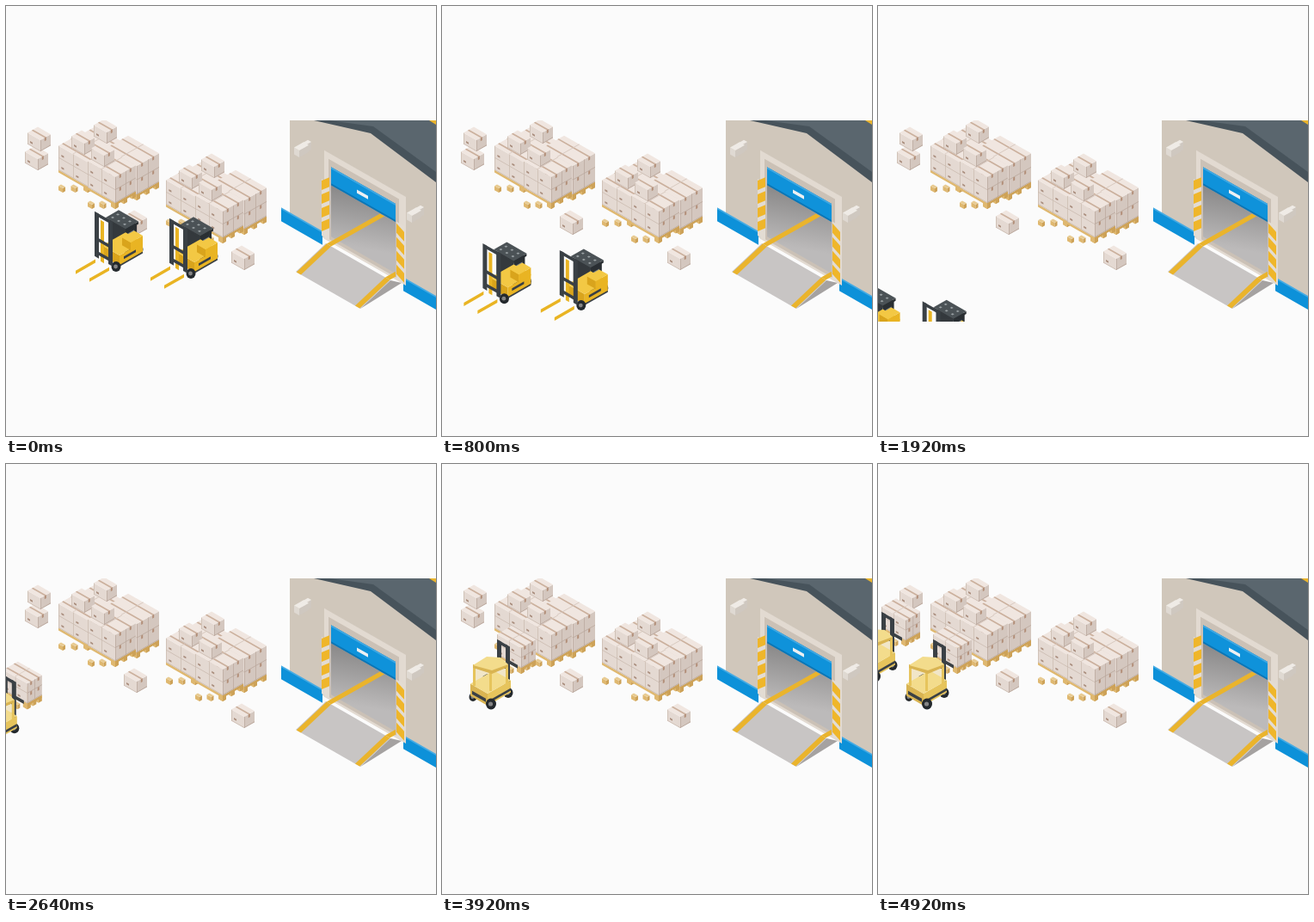
These frames come from a looping animation (500 by 500 pixels, 4960 ms). An HTML page with a canvas:

```html
<!DOCTYPE html>
<html lang="en">
<head>
<meta charset="utf-8">
<title>Warehouse loading</title>
<style>
html, body { margin: 0; height: 100%; overflow: hidden; background: #fbfbfb; }
canvas { display: block; width: 100vmin; height: 100vmin; }
</style>
</head>
<body>
<canvas id="stage" width="500" height="500"></canvas>
<script>
const ctx = document.getElementById('stage').getContext('2d');
const LOOP = 4960, STEP = 40, SLOPE = 0.57;
const DARK = '#3a4045', WOOD = ['#dfb870', '#cda258', '#e8cb92'];
const GOLD = ['#d9a41c', '#e9b423', '#f3c844'], PALE = ['#d9b452', '#e6c45c', '#f3dc8c'];
const BLACK = ['#34393d', '#2a2f33', '#4b5256'], WHITE = ['#dfd9d2', '#cfc8c0', '#efebe6'];
const CARTON = ['#e4d9d2', '#d4c7bf', '#f0e6e0'];

function rect(color, x, y, w, h) {
  ctx.fillStyle = color;
  ctx.fillRect(x, y, w, h);
}
function poly(color, ...points) {
  ctx.beginPath();
  for (let i = 0; i < points.length; i += 2) ctx.lineTo(points[i], points[i + 1]);
  ctx.fillStyle = color;
  ctx.fill();
}
function oval(color, x, y, rx, ry = rx) {
  ctx.beginPath();
  ctx.ellipse(x, y, rx, ry, 0, 0, 7);
  ctx.fillStyle = color;
  ctx.fill();
}
// Draws in a plane with origin (x, y) and the given axes.
function plane(x, y, ax, ay, bx, by, draw) {
  ctx.save();
  ctx.transform(ax, ay, bx, by, x, y);
  draw();
  ctx.restore();
}
const at = (x, y, draw) => plane(x, y, 1, 0, 0, 1, draw);
const leftSide = (x, y, draw) => plane(x, y, 1, SLOPE, 0, 1, draw);
const rightSide = (x, y, draw) => plane(x, y, 1, -SLOPE, 0, 1, draw);
const topSide = (x, y, draw) => plane(x, y, -1, -SLOPE, 1, -SLOPE, draw);

// Isometric box: (x, y) is its front top corner, a runs left, b runs right.
function cuboid(x, y, a, b, h, [left, right, top]) {
  leftSide(x, y, () => rect(left, -a, 0, a, h));
  rightSide(x, y, () => rect(right, 0, 0, b, h));
  topSide(x, y, () => rect(top, 0, 0, a, b));
}

// Cartons in na by nb columns and nh layers.
function block(x, y, a, b, h, na = 1, nb = 1, nh = 1) {
  const cw = a / na, cd = b / nb, ch = h / nh;
  cuboid(x, y, a, b, h, CARTON);
  for (let j = 0; j < nh; j++) {
    leftSide(x, y + j * ch, () => {
      for (let i = 1; i <= na; i++) {
        rect('#c9b9ae', -i * cw, 0, 0.7, ch);
        rect('#a98d7d', (0.2 - i) * cw, ch * 0.6, 3, 2);
      }
      rect('#c9b9ae', -a, ch - 0.8, a, 0.8);
    });
    rightSide(x, y + j * ch, () => {
      for (let i = 0; i < nb; i++) {
        rect('#b9a69b', i * cd, 0, 0.7, ch);
        rect('#b28e78', (i + 0.4) * cd, 0, 2, 4);
      }
      rect('#b9a69b', 0, ch - 0.8, b, 0.8);
    });
  }
  topSide(x, y, () => {
    for (let i = 0; i < nb; i++) rect('#cbb09d', 0, (i + 0.4) * cd, a, 1.7);
    for (let i = 1; i < na; i++) rect('#d5c6bc', i * cw, 0, 0.7, b);
  });
}
const carton = (x, y) => block(x, y, 15, 12, 13);

function pallet(x, y, a, b, h) {
  for (let i = 2; i >= 0; i--) {
    cuboid(x - i * (a - 5) / 2, y + h + 2, 5, 3, 5, WOOD);
    cuboid(x + i * (b - 4) / 2, y + h + 2 - i * (b - 4) / 2 * SLOPE, 3, 4, 5, WOOD);
  }
  cuboid(x, y + h, a, b, 3, WOOD);
  block(x, y, a, b, h, 2, 2, 2);
}

function stack() {
  block(124, 180, 45, 25, 22, 3, 2);
  carton(117, 147);
  pallet(152, 186, 36, 26, 33);
  pallet(95, 182, 34, 20, 28);
  carton(91, 160);
  pallet(127, 199, 32, 24, 30);
  carton(114, 174);
}

function lamp() {
  cuboid(4, -5, 4, 7, 9, WHITE);
  cuboid(-3, 1, 6, 11, 8, WHITE);
}

// Floor or ramp in unit coordinates, with a yellow strip along both sides.
function strips() {
  for (const x of [0.01, 0.92]) rect('#eab42c', x, 0, 0.07, 1);
}

function door() {
  rect('#e2dad1', 40, 145, 95, 103);
  rect('#cbc1b6', 45, 152, 82, 93);
  const shade = ctx.createLinearGradient(48, 185, 70, 240);
  shade.addColorStop(0, '#8c8b8b');
  shade.addColorStop(1, '#bcbaba');
  rect(shade, 48, 160, 75, 81);
}

function building() {
  leftSide(330, 0, () => {
    rect('#d0c7bb', 0, 0, 170, 247);
    for (const u of [-10, 132]) {
      rect('#0d91d9', u, 241, 48, 15);
      rect('#45abe4', u, 240, 48, 2);
    }
    door();
  });

  ctx.save();
  ctx.beginPath();
  ctx.rect(370, 200, 83, 130);
  ctx.clip();
  plane(372, 276, 75, 43, 62, -35, strips);
  ctx.restore();
  poly('#a5a2a1', 412, 352, 447, 319, 460, 322);
  plane(372, 276, 75, 43, -35, 33, () => {
    rect('#c8c5c4', 0, 0, 1, 1);
    strips();
  });

  leftSide(330, 0, () => {
    rect('#0f92da', 48, 160, 75, 21);
    rect('#40a9e4', 48, 160, 75, 2);
    rect('#0c75b4', 48, 179, 75, 2);
    rect('#eef1f3', 78, 169, 13, 4);
    for (const [u, lean] of [[37, -9], [124, 5]]) {
      rect('#e3dcd3', u, 180, 9, 66);
      for (let v = 182; v < 240; v += 16) poly('#efb62a', u, v, u + 9, v + lean, u + 9, v + lean + 11, u, v + 11);
    }
  });

  // Gable roof with a darker edge
  poly('#47535b', 358, 133, 424, 148, 500, 205, 500, 133);
  poly('#5a666e', 376, 133, 427, 140, 500, 193, 500, 133);
  poly('#eab42c', 492, 133, 500, 133, 500, 138);
  at(344, 167, lamp);
  at(475, 243, lamp);
}

function wheel(x, y, r) {
  oval('#24292d', x, y, r - 0.5, r);
  oval('#858585', x - 0.5, y, r * 0.4);
}

function mast(x, y, width, height) {
  leftSide(x, y, () => {
    for (const u of [0, width]) rect(DARK, u - 2, 0, 5, height);
    for (const v of [0, 0.55, 0.85]) rect(DARK, 0, v * height, width, 4);
  });
}

function loader() {
  wheel(99, 320, 6);
  cuboid(84, 298, 20, 13, 26, BLACK);
  rightSide(84, 298, () => rect('#7d8488', 3, 5, 7, 11));
  cuboid(77, 327, 20, 27, 12, GOLD);
  cuboid(90, 312, 10, 14, 9, GOLD);
  rightSide(77, 327, () => {
    rect(DARK, 5, 4, 14, 3);
    rect(DARK, 0, 11, 27, 2);
  });
  wheel(73, 340, 6);
  cuboid(84, 296, 23, 15, 3, BLACK);
  topSide(84, 296, () => {
    for (let i = 0; i < 6; i++) rect('#9ba2a5', 4 + i % 3 * 7, i < 3 ? 3 : 9, 2, 2);
  });
  leftSide(50, 277, () => rect(GOLD[1], 5, 6, 4, 48));
  mast(50, 277, 16, 52);
  for (const u of [0, 16]) rightSide(50 + u, 331 + u * SLOPE, () => rect(GOLD[1], -24, 0, 23, 4));
}

// Loader seen from behind, with its load in front of the mast.
function carrier() {
  pallet(92, 214, 28, 17, 23);
  mast(66, 205, 10, 45);
  leftSide(76, 227, () => rect(DARK, 0, 0, 12, 4));
  wheel(77, 266, 6);
  wheel(36, 271, 5);
  rect('#f1e6c8', 39, 238, 35, 18);
  oval(DARK, 55, 252, 9, 8);
  cuboid(53, 267, 20, 27, 14, PALE);
  leftSide(53, 267, () => rect(DARK, -18, 7, 16, 4));
  rightSide(53, 267, () => rect(DARK, 2, 9, 25, 3));
  wheel(57, 279, 6.5);
  for (const [x, y] of [[36, 235], [55, 241], [74, 233]]) rect(PALE[1], x, y, 3, 23);
  poly(PALE[0], 36, 237, 58, 244, 77, 236, 77, 233, 36, 233);
  poly(PALE[2], 36, 234, 52, 224, 68, 225, 77, 233, 58, 240);
}

function draw(t) {
  rect('#fbfbfb', 0, 0, 500, 500);
  ctx.save();
  ctx.beginPath();
  ctx.rect(0, 133, 500, 234);
  ctx.clip();

  building();
  stack();
  at(125, 40, stack);
  carton(37, 178);
  carton(40, 156);
  carton(152, 253);
  carton(277, 294);

  const late = t - 4920, arriving = Math.min(t - 3600, 0), second = Math.max(t - 100, 0);
  at(-60 + 0.07 * late, -32 - 0.043 * late, carrier);
  at(0.07 * arriving, -0.043 * arriving, carrier);
  at(55 - 0.0695 * t, -37 + 0.0465 * t, loader);
  at(142 - 0.076 * second, -29 + 0.053 * second, loader);
  ctx.restore();
}

function tick() {
  draw(Math.floor(performance.now() % LOOP / STEP) * STEP);
  requestAnimationFrame(tick);
}
tick();
</script>
</body>
</html>
```
